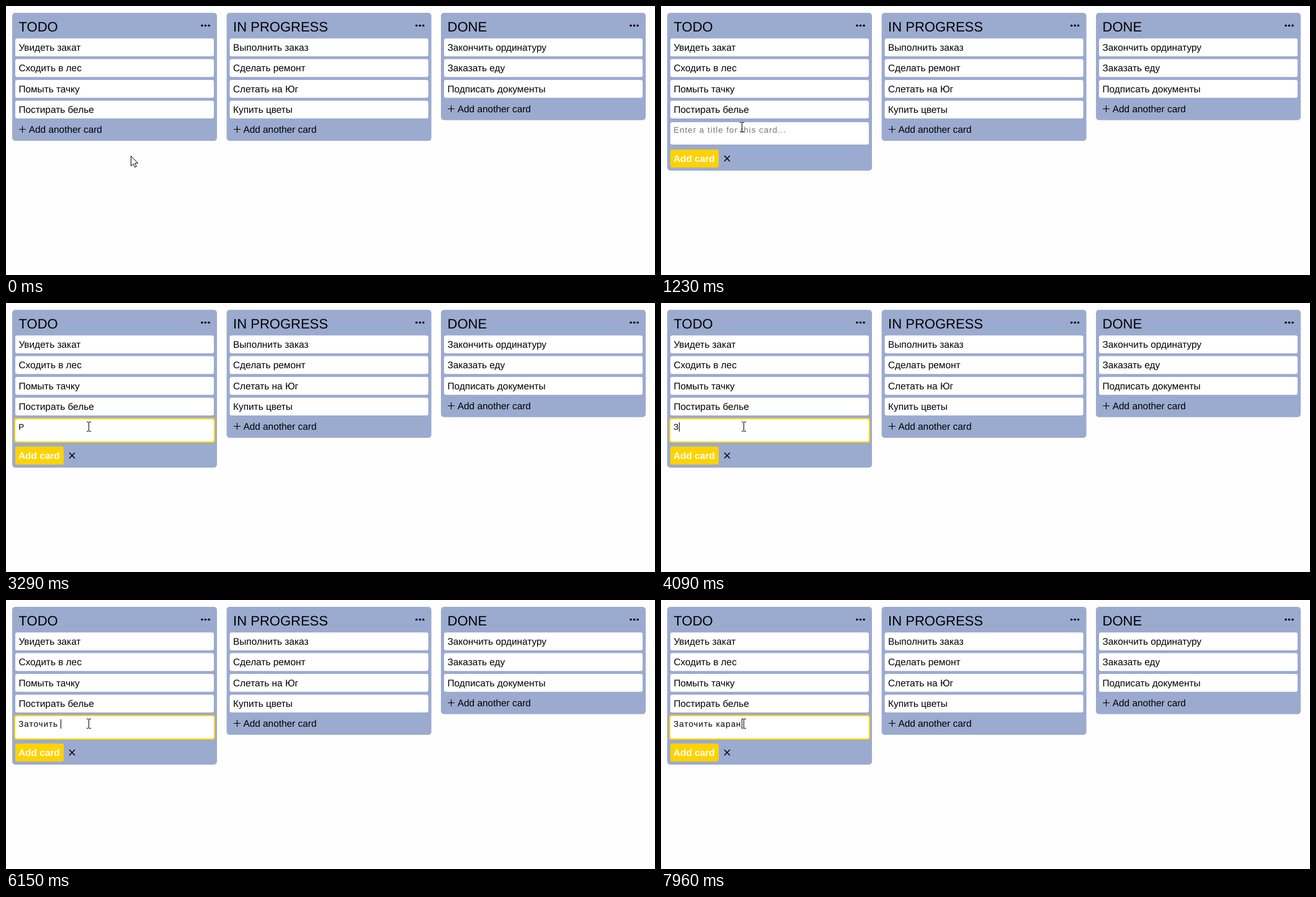
Animation of 1046x433 px, one loop 8 s. Source, as an HTML page:

```html
<!DOCTYPE html>
<html lang="ru">
<head>
<meta charset="utf-8">
<title>Board</title>
<style>
  html, body { margin: 0; width: 100%; height: 100%; overflow: hidden; background: #fefefe; }
  svg { display: block; width: 1046px; height: 433px; }
  text { font: 15.4px "Liberation Sans", Arial, sans-serif; white-space: pre; text-rendering: geometricPrecision; }
  .title { font-size: 22px; }
  .input { font-size: 13.333px; letter-spacing: 1px; }
  .hint { fill: #757575; }
  .button { font-weight: bold; fill: #fff; }
  .line { fill: none; stroke: #000; }
</style>
</head>
<body>
<svg id="stage" viewBox="0 0 1046 433"></svg>
<script>
const LOOP = 8000;
const BLUE = '#9baacf', GOLD = '#ffd200';
const PITCH = 33.4;

const columns = [
  { x: 10, title: 'TODO', cards: ['Увидеть закат', 'Сходить в лес', 'Помыть тачку', 'Постирать белье'] },
  { x: 355.6, title: 'IN PROGRESS', cards: ['Выполнить заказ', 'Сделать ремонт', 'Слетать на Юг', 'Купить цветы'] },
  { x: 701, title: 'DONE', cards: ['Закончить ординатуру', 'Заказать еду', 'Подписать документы'] },
];

// [time, pointer x, pointer y]
const pointer = [[0, 201, 241], [150, 158, 216], [270, 133, 198], [420, 128, 194],
  [1230, 130, 187], [1630, 129, 191], [1930, 133, 191]];

// [time, typed text, caret x or 0 when hidden]
const typing = [
  [0, '', 0], [1780, '', 20], [2300, '', 0],
  [2730, 'P', 30], [3290, 'P', 0], [3410, '', 0], [3840, '', 20],
  [4090, 'З', 29], [4620, 'За', 37], [4770, 'Зато', 52], [4920, 'Заточ', 60],
  [5170, 'Заточи', 68], [5290, 'Заточит', 76], [5440, 'Заточить', 84], [5870, 'Заточить', 0],
  [6150, 'Заточить ', 88], [6430, 'Заточить к', 95], [6580, 'Заточить ка', 104],
  [6980, 'Заточить к', 95], [7130, 'Заточить ка', 104], [7690, 'Заточить кар', 113],
  [7840, 'Заточить кара', 121], [7960, 'Заточить каран', 130],
];
const OPEN = 1230, FOCUS = 1780;

const stage = document.getElementById('stage');

function add(parent, tag, attrs = {}, content = '') {
  const el = document.createElementNS('http://www.w3.org/2000/svg', tag);
  for (const key in attrs) el.setAttribute(key, attrs[key]);
  el.textContent = content;
  return parent.appendChild(el);
}
const group = () => add(stage, 'g');
const box = (parent, x, y, width, height, rx, fill) => add(parent, 'rect', { x, y, width, height, rx, fill });
const label = (parent, x, y, content, cls = '') => add(parent, 'text', { x, y, class: cls }, content);
const line = (parent, d, width) => add(parent, 'path', { d, class: 'line', 'stroke-width': width });

function addColumn({ x, title, cards }) {
  const bottom = 52.2 + cards.length * PITCH;
  const panel = box(stage, x, 11, 330, bottom + 31.3 - 11, 5, BLUE);
  label(stage, x + 10.5, 41, title, 'title');
  for (let i = 0; i < 3; i++) add(stage, 'circle', { cx: x + 306 + i * 5.5, cy: 31.5, r: 1.8 });
  cards.forEach((card, i) => {
    const y = 52.2 + i * PITCH;
    box(stage, x + 5, y, 320, 28.7, 3, '#fff');
    label(stage, x + 10.4, Math.round(y + 19.8), card);
  });
  const link = group();
  const px = Math.round(x) + 16, py = Math.round(bottom + 12.6);
  line(link, `M${px - 5} ${py}.5h11M${px}.5 ${py - 5}v11`, 1.1);
  label(link, x + 26.8, py + 6, 'Add another card');
  return { panel, link };
}

const [todo] = columns.map(addColumn);
const closedHeight = todo.panel.getAttribute('height');

const form = group();
const ring = box(form, 13, 185, 324, 40, 4, GOLD);
box(form, 15, 187, 320, 36, 3, '#fff');
const hint = label(form, 20.3, 204, 'Enter a title for this card...', 'input hint');
const typed = label(form, 20.3, 204, '', 'input');
const caret = box(form, 0, 192, 1, 15, 0, '#000');
box(form, 15, 231, 78, 29, 3, GOLD);
label(form, 20, 251, 'Add card', 'button');
line(form, 'M102 241l9 9M111 241l-9 9', 1.5);

const arrow = add(stage, 'path', {
  d: 'M.5 .5V16.5L4.2 13L6.6 18.5L9.2 17.4L6.8 12H11.6Z',
  fill: '#fff', stroke: '#000', 'stroke-width': 1,
});
const beam = line(stage, 'M-3 .5h3M1 .5h3M.5 1v14M-3 15.5h3M1 15.5h3', 1);

const show = (el, on) => el.setAttribute('visibility', on ? 'inherit' : 'hidden');
const at = (steps, t) => steps.findLast(step => step[0] <= t);

function render(t) {
  const open = t >= OPEN;
  todo.panel.setAttribute('height', open ? 254 : closedHeight);
  show(todo.link, !open);
  show(form, open);
  show(ring, open && t >= FOCUS);

  const [, content, caretX] = at(typing, t);
  typed.textContent = content;
  show(hint, open && !content);
  show(caret, open && caretX > 0);
  caret.setAttribute('x', caretX);

  const [, x, y] = at(pointer, t);
  show(arrow, !open);
  show(beam, open);
  (open ? beam : arrow).setAttribute('transform', `translate(${x} ${y})`);
}

const start = performance.now();
function tick() {
  render((performance.now() - start) % LOOP);
  requestAnimationFrame(tick);
}
tick();
</script>
</body>
</html>
```
